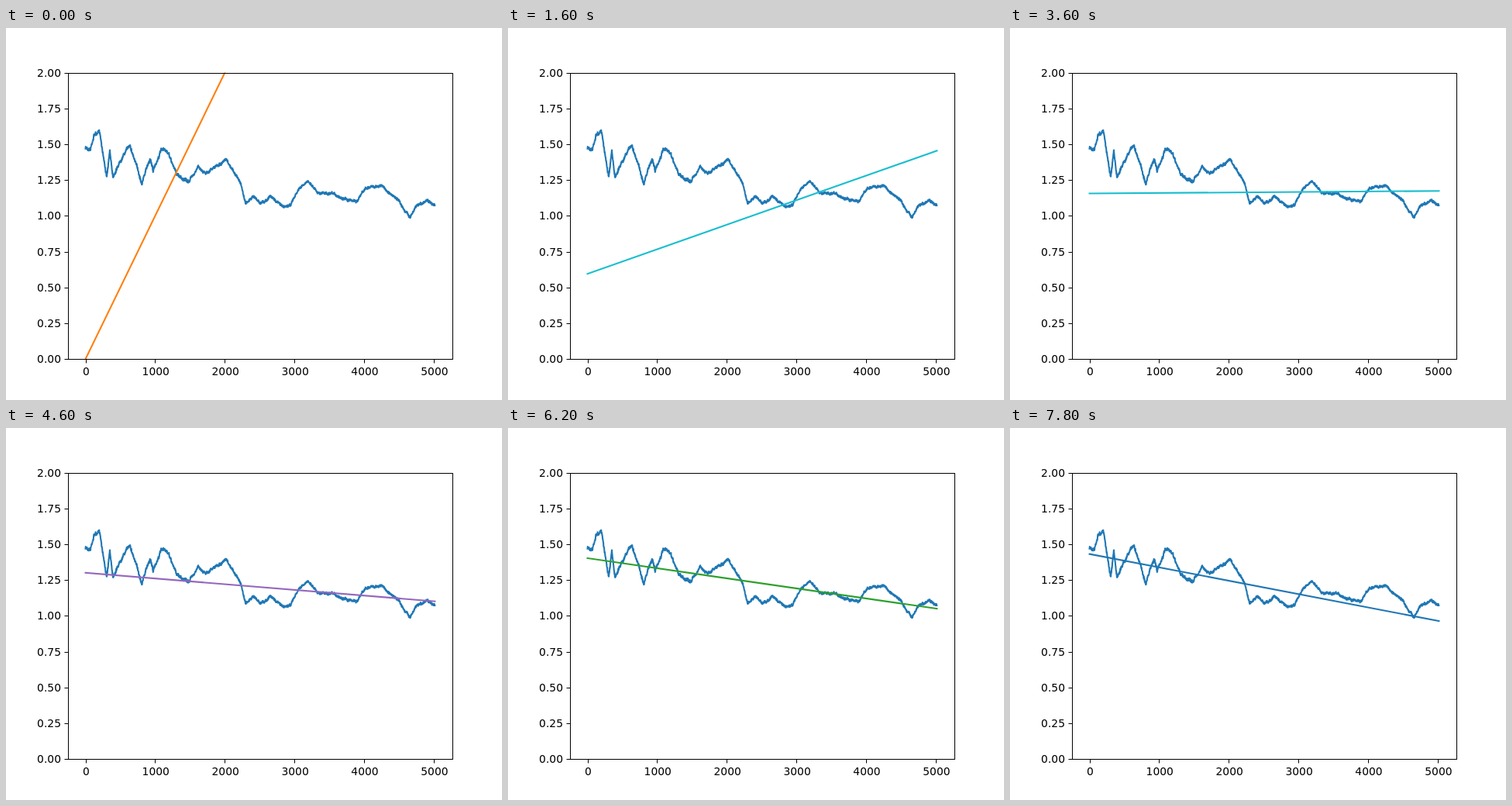
Recreate the animation shown at these times as an HTML page. Size 640x480 px, loop 8000 ms.

```html
<!DOCTYPE html>
<html lang="en">
<head>
<meta charset="utf-8">
<title>Line fit</title>
<style>
  html, body { margin: 0; width: 100%; height: 100%; overflow: hidden; background: #fff; }
  svg { display: block; width: 100vw; height: 100vh; }
  text { font: 13.89px "DejaVu Sans", sans-serif; fill: #000; }
</style>
</head>
<body>
<svg viewBox="0 0 640 480">
  <clipPath id="plot"><rect x="80" y="57.6" width="496" height="369.6"/></clipPath>
  <g clip-path="url(#plot)" fill="none" stroke-width="2.08" stroke-linecap="square">
    <path id="series" stroke="#1f77b4" stroke-linejoin="round"/>
    <path id="fit"/>
  </g>
  <g id="axes" fill="none" stroke="#000">
    <rect x="80.5" y="58.5" width="496" height="369"/>
  </g>
  <g id="labels"></g>
</svg>
<script>
const $ = id => document.getElementById(id);
const STEP = 200, FRAMES = 40;
const X0 = 102.545, X1 = 553.455, Y0 = 427.2, UNIT = 184.8;
const COLORS = ['#1f77b4', '#ff7f0e', '#2ca02c', '#d62728', '#9467bd',
                '#8c564b', '#e377c2', '#7f7f7f', '#bcbd22', '#17becf'];
const yOf = value => Y0 - value * UNIT;

function add(parent, tag, attrs, text = '') {
  const el = document.createElementNS('http://www.w3.org/2000/svg', tag);
  for (const k in attrs) el.setAttribute(k, attrs[k]);
  el.textContent = text;
  $(parent).append(el);
}

function drawAxes() {
  for (let i = 0; i <= 8; i++) {
    const y = Math.round(yOf(i / 4)) + 0.5;
    add('axes', 'path', { d: `M75.5 ${y}H80.5` });
    add('labels', 'text', { x: 71, y: y + 4.5, 'text-anchor': 'end' }, (i / 4).toFixed(2));
  }
  for (let i = 0; i <= 5; i++) {
    const x = X0 + i * 89.91;
    add('axes', 'path', { d: `M${Math.round(x) + 0.5} 427.5V432.5` });
    add('labels', 'text', { x: x + 0.8, y: 448, 'text-anchor': 'middle' }, i * 1000);
  }
}

// Main turning points of the series; seeded noise fills in the rest.
const turns = [
  [X0, 155], [109, 155], [114, 136], [121, 135], [130, 192], [134, 160], [138, 191],
  [150, 165], [160, 150], [175, 199], [186, 168], [190, 184], [200, 158], [208, 160],
  [220, 188], [235, 199], [248, 179], [257, 187], [284, 171], [303, 200], [309, 226],
  [319, 216], [329, 227], [341, 217], [358, 231], [367, 228], [378, 208], [391, 198],
  [402, 211], [453, 223], [464, 207], [484, 203], [506, 223], [521, 244], [530, 228],
  [543, 223], [X1, 228]];

function drawSeries() {
  let seed = 7, drift = 0, i = 0;
  const noise = () => (seed = seed * 16807 % 2147483647) / 2147483647 - 0.5;
  const pts = [];
  for (let x = X0; x <= X1; x += 0.25) {
    while (x > turns[i + 1][0]) i++;
    const [xa, ya] = turns[i], [xb, yb] = turns[i + 1];
    const size = x < 240 ? 1.3 : 1;
    drift = drift * 0.94 + noise() * 1.1;
    const y = ya + (yb - ya) * (x - xa) / (xb - xa) + size * (drift + noise() * 2.6);
    pts.push(x.toFixed(2) + ' ' + y.toFixed(2));
  }
  $('series').setAttribute('d', 'M' + pts.join('L'));
}

// The line drops at once onto a pivot, then turns about it and settles a little lower.
function fitEnds(step) {
  const left = 1.44 * Math.tanh(step * (0.0498 + 0.00065 * step));
  const settle = Math.min(Math.max((step - 31) / 5, 0), 1);
  const pivot = 1.168 + 2.172 * Math.exp(-9 * step) - 0.048 * settle;
  return [left, left + (pivot - left) * 1.5015];
}

function render(ms) {
  const step = Math.floor(ms / STEP) % FRAMES;
  const [left, right] = fitEnds(step).map(yOf);
  $('fit').setAttribute('d', `M${X0} ${left}L${X1} ${right}`);
  $('fit').setAttribute('stroke', COLORS[(step + 1) % COLORS.length]);
}

drawAxes();
drawSeries();
render(0);
const start = performance.now();
requestAnimationFrame(function tick() {
  render(performance.now() - start);
  requestAnimationFrame(tick);
});
</script>
</body>
</html>
```
